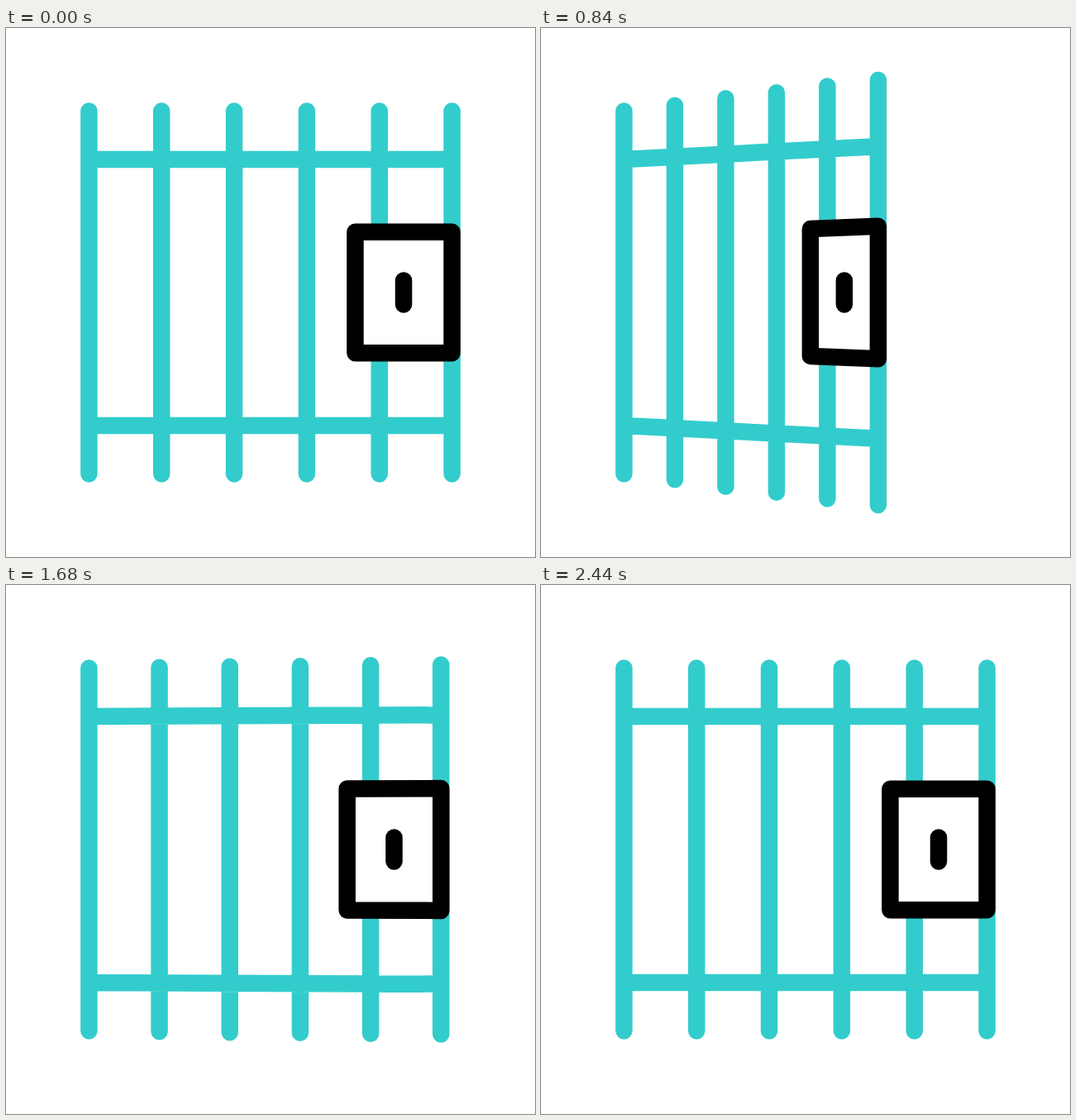
Write an HTML page that moves like this. It is 640x640 px and loops after 2.52 s.

```html
<!DOCTYPE html>
<html lang="en">
<head>
<meta charset="utf-8">
<title>Swinging gate</title>
<style>
  html, body { margin: 0; width: 100%; height: 100%; overflow: hidden; background: #fff; }
  svg { display: block; width: 100%; height: 100%; }
  path { stroke-width: 20.5; stroke-linecap: round; stroke-linejoin: round; }
  #gate { fill: none; stroke: #33cccc; }
  #lock { fill: #fff; stroke: #000; }
  #keyhole { fill: none; stroke: #000; }
</style>
</head>
<body>
<svg viewBox="0 0 640 640">
  <path id="gate"/>
  <path id="lock"/>
  <path id="keyhole"/>
</svg>
<script>
const LOOP = 2520, STEP = 40;
const LEFT = 100.4, WIDTH = 439.2, MID = 320;
const BAR_HALF = 219.6, RAIL_HALF = 161.1, LOCK_HALF = 73.2;
const BAR_RISE = [0, 0.18, 0.405, 0.593, 0.8, 1];

// start, peak, end, travel of the free edge, softness of opening and closing
const swings = [
  [80, 600, 1076, 195, 0.69, 0.52],
  [1076, 1400, 1720, 77.4, 0.55, 0.55],
  [1720, 2080, 2440, 40.4, 0.55, 0.55]
];

const [gate, lock, keyhole] = ['gate', 'lock', 'keyhole'].map(id => document.getElementById(id));

// Leaves the peak slowly and meets the frame at speed
const fall = (u, k) => 3 * k * (1 - u) * u * u + u * u * u;

function travel(t) {
  for (const [start, peak, end, size, kOpen, kClose] of swings) {
    if (t < start || t >= end) continue;
    return t < peak
      ? size * (1 - fall((peak - t) / (peak - start), kOpen))
      : size * (1 - fall((t - peak) / (end - peak), kClose));
  }
  return 0;
}

const pt = (x, y) => x.toFixed(2) + ' ' + y.toFixed(2);
const line = (x1, y1, x2, y2) => `M${pt(x1, y1)}L${pt(x2, y2)}`;

function draw(t) {
  const shift = travel(t);
  const rise = shift * 0.284;
  const at = part => LEFT + (WIDTH - shift) * part;
  const right = at(1);

  let d = '';
  BAR_RISE.forEach((r, i) => {
    const x = at(i / 5), h = BAR_HALF + rise * r;
    d += line(x, MID - h, x, MID + h);
  });
  for (const side of [-1, 1]) {
    d += line(LEFT, MID + side * RAIL_HALF, right, MID + side * (RAIL_HALF + rise * 0.42));
  }
  gate.setAttribute('d', d);

  const lx = at(0.7333), lh = LOCK_HALF + rise * 0.1, rh = LOCK_HALF + rise * 0.187;
  lock.setAttribute('d',
    `M${pt(lx, MID - lh)}L${pt(right, MID - rh)}L${pt(right, MID + rh)}L${pt(lx, MID + lh)}Z`);

  const kx = at(0.8667);
  keyhole.setAttribute('d', line(kx, 305.4, kx, 334.6));
}

let origin = null;
function tick(now) {
  if (origin === null) origin = now;
  const t = Math.max(0, now - origin) % LOOP;
  draw(Math.floor(t / STEP) * STEP);
  requestAnimationFrame(tick);
}
draw(0);
requestAnimationFrame(tick);
</script>
</body>
</html>
```
